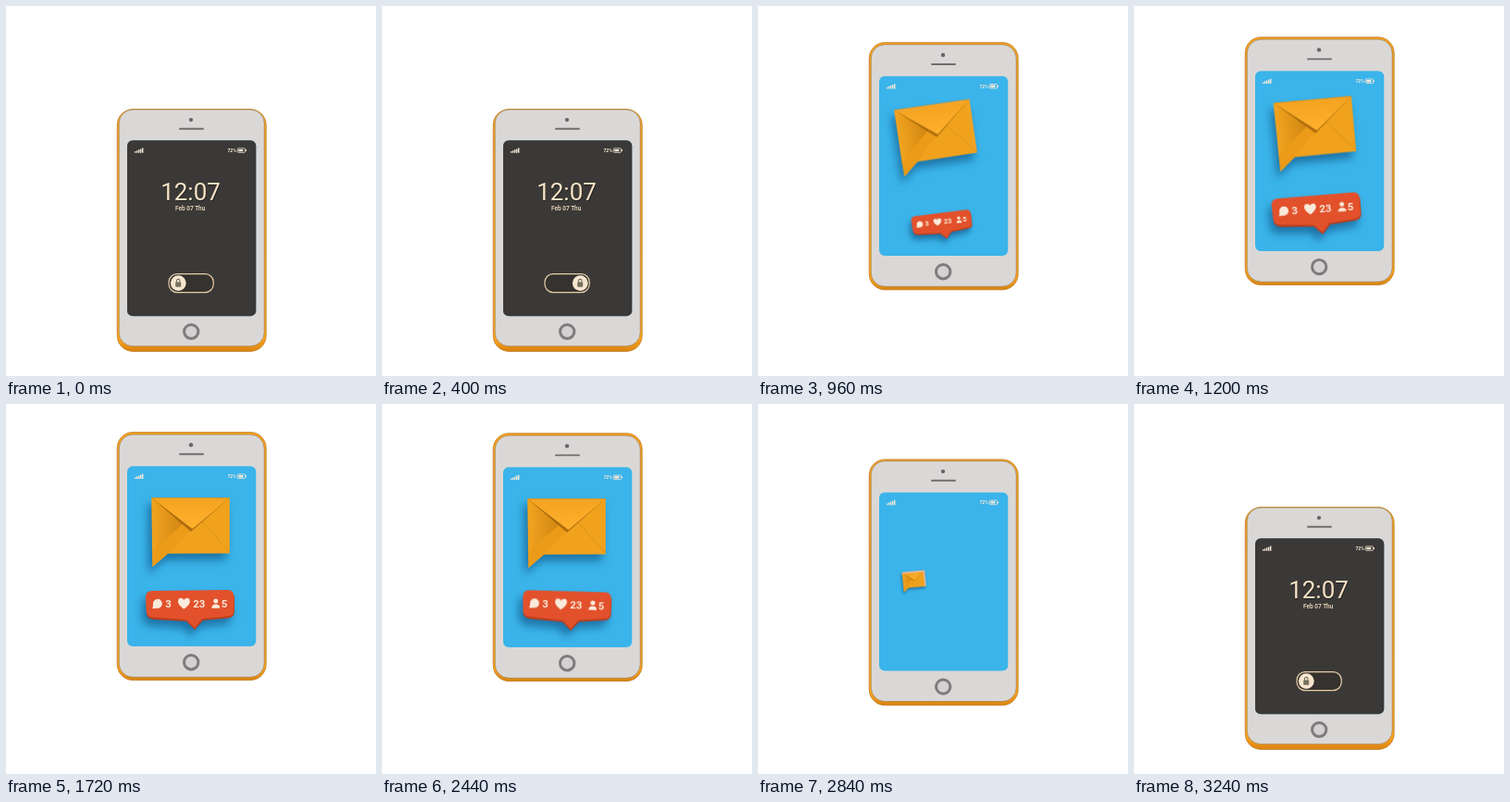
Recreate the animation shown at these times as an HTML page. Size 400 px wide and 400 px high, loop 3800 ms.

```html
<!DOCTYPE html>
<html lang="en">
<head>
<meta charset="utf-8">
<title>Phone notifications</title>
<style>
html, body { margin: 0; width: 100%; height: 100%; overflow: hidden; background: #fff; }
svg { display: block; width: 100%; height: 100%; }
text { font-family: Roboto, sans-serif; }
.paper { filter: drop-shadow(-4px 7px 5px rgba(6, 62, 112, .55)); }
</style>
</head>
<body>
<svg viewBox="0 0 400 400">
  <defs>
    <linearGradient id="rim" x1="0" y1="0" x2="0" y2="1">
      <stop offset="0" stop-color="#f5a01f"/>
      <stop offset=".95" stop-color="#fba21b"/>
      <stop offset="1" stop-color="#d98312"/>
    </linearGradient>
    <linearGradient id="flap" x1="0" y1="0" x2="0" y2="1">
      <stop offset="0" stop-color="#f3a320"/>
      <stop offset="1" stop-color="#ffb02c"/>
    </linearGradient>
    <linearGradient id="fold" x1="0" y1="0" x2="1" y2="0">
      <stop offset="0" stop-color="#f2a41f"/>
      <stop offset="1" stop-color="#cf8511"/>
    </linearGradient>
    <clipPath id="glass"><rect x="131" y="37.2" width="139.3" height="194.8" rx="6"/></clipPath>
  </defs>

  <rect id="back" x="120.2" width="161" rx="17" fill="url(#rim)" stroke="#b87416" stroke-width=".7"/>
  <g id="face">
    <rect x="122.2" y="3" width="157" height="262.3" rx="15" fill="#dad8d7" stroke="#a37c42" stroke-width=".7"/>
    <circle cx="200" cy="14.3" r="2.2" fill="#67646a"/>
    <path d="M188 24.3H213" stroke="#716c6e" stroke-width="1.9" stroke-linecap="round"/>
    <circle cx="200.2" cy="249.2" r="7.7" fill="#d3d1d1" stroke="#7f7b7c" stroke-width="3"/>
    <g clip-path="url(#glass)">
      <rect x="131" y="37" width="140" height="196" fill="#3ab4ea"/>
      <g id="mail">
        <g class="paper">
          <path d="M157.5 71.5H241.8V131.5L175 131.8 158.5 146Z" fill="#f0a21d"/>
          <path d="M157.5 71.5L192 99 158 133Z" fill="url(#fold)"/>
          <path d="M192 99L158 129 158.5 146 175 131.8 201 105Z" fill="#eb9b18"/>
          <path d="M212 97L241.8 130" stroke="#d68d16" stroke-width=".7"/>
          <path d="M157.5 71.5L200 108 241.8 71.5Z" fill="#945b08" opacity=".7"/>
          <path d="M157.5 71.5L201.5 105 241.8 71.5Z" fill="url(#flap)"/>
          <path id="edge" d="M157.5 73.5H239.8V131.5" fill="none" stroke="#e9c0d0" stroke-width="4"/>
        </g>
      </g>
      <g id="bubble">
        <g class="paper">
          <path d="M158 174H240Q247 173 247 180V194Q247 201 240 201.5L213 204 204 214 195 205 160 203Q152 202 152 196V180Q152 174 158 174Z" fill="#b83d1e"/>
          <path d="M158 172L240 171Q246.3 171 246.3 178V193Q246.3 199 240 199.6L212 202.3 204 212 195 203.2 159 200.5Q152 200 151.6 194L151 179Q151 172 158 172Z" fill="#e2512b"/>
          <g fill="#faeadb">
            <path d="M158.4 191.2L159 187A5 5 0 1 1 163 190.8Z"/>
            <path d="M192.4 191.6C189 189 186 186.4 186 183.2C186 179.4 190.6 178.6 192.4 182C194.2 178.6 198.8 179.4 198.8 183.2C198.8 186.4 195.8 189 192.4 191.6Z"/>
            <circle cx="226.8" cy="183" r="2.5"/>
            <path d="M222.4 190.8Q222.4 186.6 226.8 186.6T231.2 190.8Z"/>
            <g font-size="11.4" font-weight="700">
              <text x="172.2" y="190.1">3</text>
              <text x="202.3" y="190.1">23</text>
              <text x="232.7" y="190.1">5</text>
            </g>
          </g>
        </g>
      </g>
      <g id="lock" transform="scale(1 1.0256) translate(0 -109.1)">
        <rect x="130" y="144" width="142" height="193" fill="#3b3937"/>
        <g fill="#f9e3c5" text-anchor="middle">
          <text x="200.2" y="211" font-size="26" fill="#1f1d1c">12:07</text>
          <text x="199.5" y="209.8" font-size="26">12:07</text>
          <text x="199.2" y="221" font-size="6.5" font-weight="500">Feb 07 Thu</text>
        </g>
        <rect x="176" y="289.6" width="48.3" height="20" rx="9" fill="#35322f" stroke="#e9cfa9" stroke-width="1.2"/>
        <g id="knob">
          <circle cx="186.3" cy="299.6" r="8.4" fill="#f7e6cf"/>
          <rect x="183.2" y="298.6" width="6" height="5.2" rx=".8" fill="#77705f"/>
          <path d="M184.4 299V297.2A1.8 1.8 0 0 1 188 297.2V299" fill="none" stroke="#77705f" stroke-width="1.1"/>
        </g>
      </g>
      <g fill="#f5e8d6">
        <path d="M139 51v-1.8h1.4V51zM141 51v-2.7h1.4V51zM143 51v-3.6h1.4V51zM145 51v-4.5h1.4V51zM147 51v-5.4h1.4V51z"/>
        <text x="239.5" y="50.2" font-size="5" font-weight="700">72%</text>
        <rect x="250.2" y="45.9" width="8.4" height="4.6" rx="1" fill="none" stroke="#f5e8d6" stroke-width=".8"/>
        <path d="M251.3 47h5v2.4h-5zM259.1 47.2h.9v2h-.9z"/>
      </g>
    </g>
  </g>
</svg>
<script>
const LOOP = 3800, STEP = 40;
const $ = id => document.getElementById(id);
const lerp = (a, b, k) => a + (b - a) * k;
const ramp = (t, a, b) => Math.min(1, Math.max(0, (t - a) / (b - a)));

// S-curve from 0 to 1 between a and b; lead > 1 moves early, < 1 late
function sway(t, a, b, lead = 1, power = 1.5) {
  const u = ramp(t, a, b), go = lead * u ** power;
  return go / (go + (1 - u) ** power);
}

function set(id, attrs) {
  for (const name in attrs) $(id).setAttribute(name, attrs[name]);
}

function pop(id, x, y, size, turn) {
  set(id, { transform: `translate(${x} ${y}) rotate(${turn}) scale(${size}) translate(${-x} ${-y})` });
}

function draw(t) {
  const rise = sway(t, 400, 1720, 12.8) - sway(t, 2280, 3240, .3, 1.9);
  const slide = sway(t, 0, 320) - sway(t, 3000, 3240);
  const unlock = sway(t, 460, 580) - sway(t, 2900, 3020);
  const mail = sway(t, 560, 1040, 3.76) - sway(t, 2520, 2920, .31);
  const bubble = sway(t, 760, 1120, 1.5) - sway(t, 2460, 2780);
  const settle = (1 - ramp(t, 560, 1680)) ** 1.2;

  const top = lerp(111.6, 30.5, rise), bottom = lerp(373.4, 298.6, rise);
  set("back", { y: top, height: bottom - top });
  set("face", { transform: `translate(0 ${lerp(109.1, 30, rise)}) scale(1 ${lerp(.975, 1, rise)})` });
  set("knob", { transform: `translate(${28 * slide} 0)` });
  set("lock", { opacity: 1 - unlock });
  set("edge", { opacity: Math.min(1, 1.6 * (1 - mail)) });
  pop("mail", 158, 146, mail, -14 * settle - 8 * ramp(t, 2440, 2920) ** 2);
  pop("bubble", 204, 213, bubble, -11 * settle + 8 * ramp(t, 2280, 2840));
}

const start = performance.now();
function tick() {
  const t = (performance.now() - start) % LOOP;
  draw(Math.floor(t / STEP) * STEP);
  requestAnimationFrame(tick);
}
draw(0);
requestAnimationFrame(tick);
</script>
</body>
</html>
```
